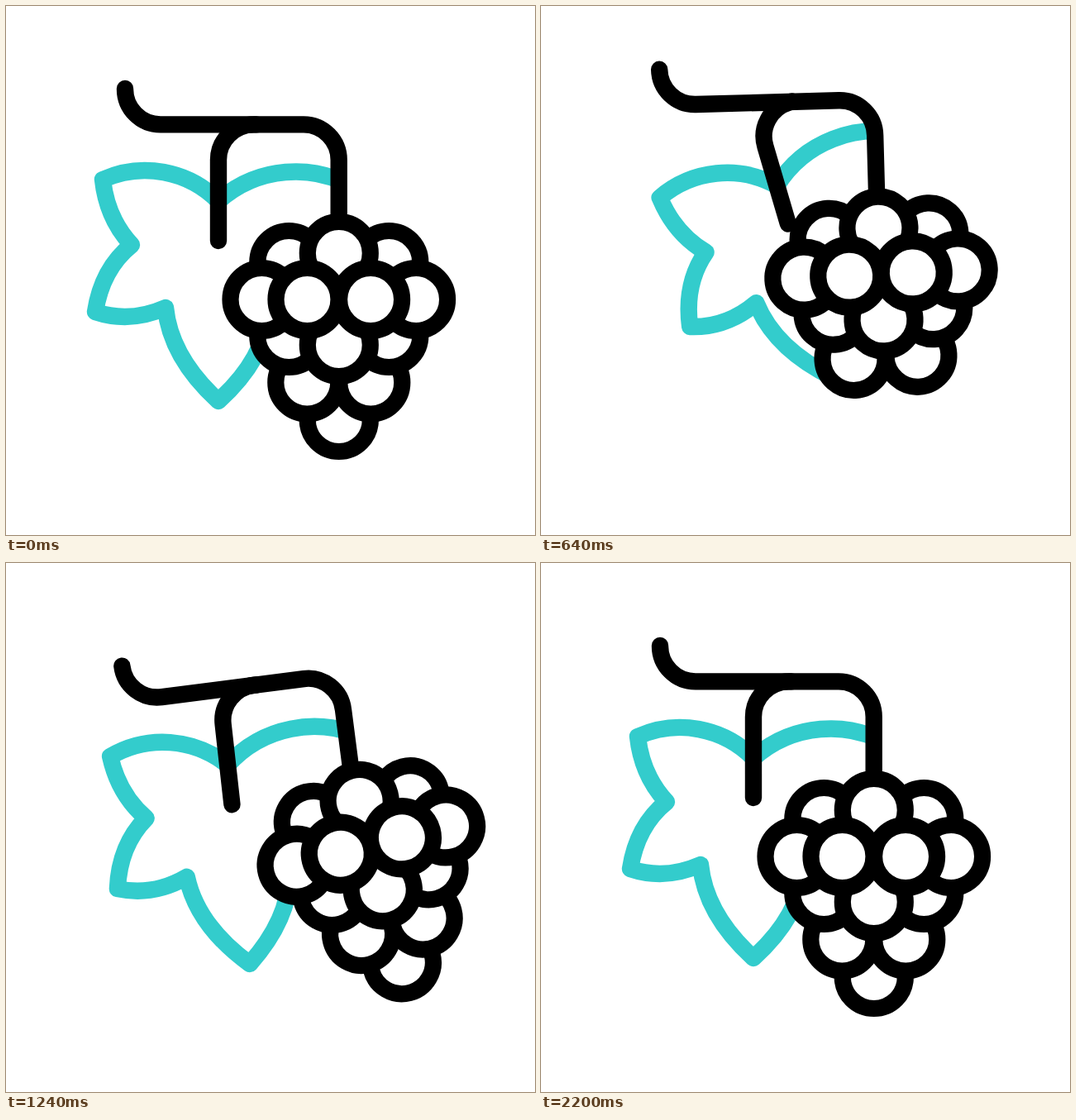
An HTML page for the animation above (2400 ms loop, 640 by 640 pixels).

```html
<!DOCTYPE html>
<html lang="en">
<head>
<meta charset="utf-8">
<title>Grapes</title>
<style>
html, body { margin: 0; width: 100%; height: 100%; overflow: hidden; background: #fff; }
svg { display: block; width: 100vw; height: 100vh; }
.ink { fill: none; stroke: #000; }
.teal { fill: none; stroke: #33cccc; }
.line { stroke-width: 20.4; stroke-linecap: round; stroke-linejoin: round; }
.grape { fill: #fff; stroke: #000; stroke-width: 20.2; }
</style>
</head>
<body>
<svg viewBox="0 0 640 640">
  <defs>
    <clipPath id="side"><rect x="-500" y="-500" width="902" height="1600"/></clipPath>
  </defs>
  <g id="dashes" class="teal line"></g>
  <g id="vine">
    <g clip-path="url(#side)">
      <path id="leaf" class="teal line" d="M424 221.5 A140 140 0 0 0 257 236 A125 125 0 0 0 117 210
        Q122 257 152 289 Q116 318 108 370 Q150 384 193 365
        Q199 425 257 478 Q313 427 317 372 L313 340"/>
    </g>
    <path id="stalk" class="ink line" d="M303 143.4 H300 A43 43 0 0 0 257 187 V284"/>
    <path class="ink line" d="M144 100 A43 43 0 0 0 187 143.4 H360 A42.7 43 0 0 1 402.7 187 V258"/>
    <g id="bunch"></g>
  </g>
  <circle id="drop" class="grape" r="38"/>
</svg>
<script>
const LOOP = 2400, LAG = 132;
const NS = 'http://www.w3.org/2000/svg';
const $ = id => document.getElementById(id);

// Swing angle and vertical bounce as [time, value] turning points.
const SWING = [[0, 0], [424, -17.7], [868, 16], [1280, -7.9], [1705, 3.5], [2075, 0]];
const BOUNCE = [[0, 0], [320, 48], [735, -34], [1068, 54.5], [1440, -20.5], [1800, 15.2], [2150, 0]];

const MIDDLE = 402.8;
// Rows from back to front: half spacing, height.
const ROWS = [[0, 501], [38.5, 455.5], [60.5, 399], [60.5, 310], [93.3, 355],
              [0, 410], [0, 299], [38.3, 355]];
const RAYS = [-8.6, 21.2];

function make(parent, tag, attrs) {
  const el = document.createElementNS(NS, tag);
  for (const k in attrs) el.setAttribute(k, attrs[k]);
  return parent.appendChild(el);
}

const grapes = [];
for (const [dx, cy] of ROWS) {
  for (const side of dx ? [-1, 1] : [0]) {
    grapes.push(make($('bunch'), 'circle', { class: 'grape', cx: MIDDLE + side * dx, cy, r: 38 }));
  }
}
const tail = grapes[0];
const rays = RAYS.map(() => make($('dashes'), 'line', {}));

const clamp = x => Math.min(1, Math.max(0, x));
const smooth = p => (1 - Math.cos(Math.PI * p)) / 2;

function track(keys, t) {
  if (t <= keys[0][0]) return keys[0][1];
  for (let i = 1; i < keys.length; i++) {
    const [t0, a] = keys[i - 1], [t1, b] = keys[i];
    if (t < t1) return a + (b - a) * smooth((t - t0) / (t1 - t0));
  }
  return keys[keys.length - 1][1];
}

const turn = (el, angle, x, y, lift = 0) =>
  el.setAttribute('transform', `translate(0 ${lift}) rotate(${angle} ${x} ${y})`);
const show = (el, on) => el.setAttribute('visibility', on ? 'visible' : 'hidden');

function drawDrop(t) {
  const p = t / 320, fall = t > 0 && t < 400;
  show($('drop'), fall);
  $('drop').setAttribute('cx', MIDDLE - 5.5 * clamp(p));
  $('drop').setAttribute('cy', 501 + 160 * p * p);

  const scale = t <= 0 ? 1 : smooth(clamp((t - 700) / 240));
  show(tail, scale > 0);
  tail.setAttribute('transform',
    `translate(${MIDDLE} 501) scale(${scale}) translate(${-MIDDLE} -501)`);
}

function drawRays(t) {
  const p = (t - 220) / 200, on = p > 0 && p < 1;
  show($('dashes'), on);
  if (!on) return;
  const near = 130 + 116 * Math.pow(p, 1.22);
  const far = 130 + 116 * Math.sin(p * Math.PI / 2);
  rays.forEach((ray, i) => {
    const a = RAYS[i] * Math.PI / 180;
    [near, far].forEach((r, j) => {
      ray.setAttribute('x' + (j + 1), 358 + r * Math.cos(a));
      ray.setAttribute('y' + (j + 1), 527 + r * Math.sin(a));
    });
  });
}

function draw(t) {
  const swing = track(SWING, t), late = track(SWING, t - LAG);
  turn($('vine'), swing, 167, 130, track(BOUNCE, t));
  turn($('bunch'), swing, MIDDLE, 258);
  turn($('leaf'), late, 302, 143);
  turn($('stalk'), late, 302, 143);
  drawDrop(t);
  drawRays(t);
}

let start = null;
function tick(now) {
  if (start === null) start = now;
  draw((now - start) % LOOP);
  requestAnimationFrame(tick);
}
draw(0);
requestAnimationFrame(tick);
</script>
</body>
</html>
```
